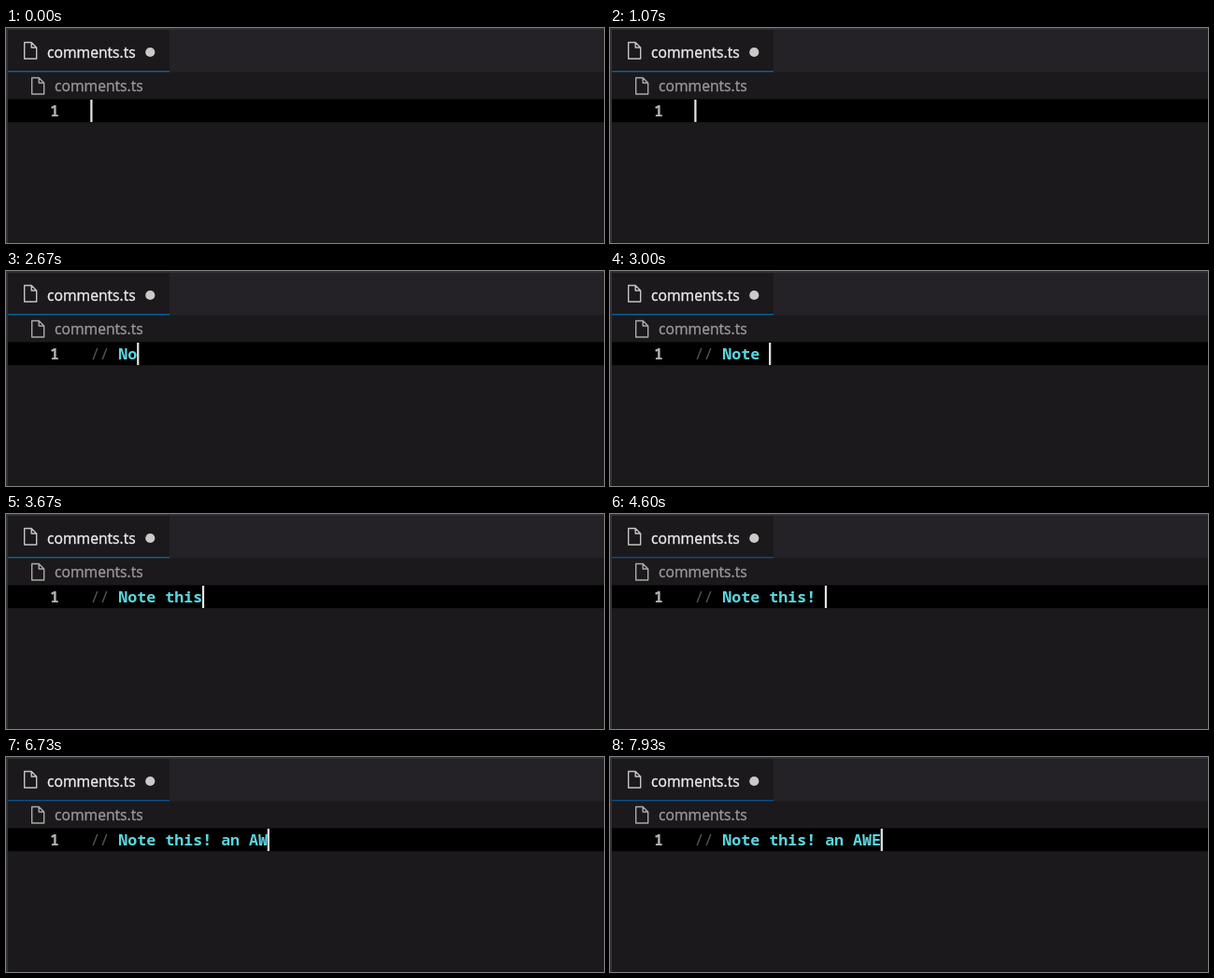
Animation, 640 px wide and 231 px high, one loop 8 s. Source, as an HTML page:

```html
<!DOCTYPE html>
<html lang="en">
<head>
<meta charset="utf-8">
<title>Typing a comment</title>
<style>
  html, body { margin: 0; width: 100%; height: 100%; overflow: hidden; background: #1b191c; }
  svg { display: block; }
  text { white-space: pre; }
  .ui { font: 15.7px "Open Sans", "Noto Sans", sans-serif; stroke-width: .35; }
  .code { font: 600 16.65px "Noto Sans Mono", "DejaVu Sans Mono", monospace; }
  .icon { fill: none; stroke-width: 1.4; stroke-linejoin: round; }
  #line { animation: dim 8s step-end infinite; }
  @keyframes dim {
    0% { fill: #0a6499; }
    52.5% { fill: #0a4f8a; }
  }
</style>
</head>
<body>
<svg width="640" height="231" viewBox="0 0 640 231">
  <defs>
    <path id="file" d="M1 1H8.5L14 6.5V18.5H1ZM8.5 1V6.5H14"/>
  </defs>
  <rect width="640" height="231" fill="#1b191c"/>
  <rect x="175" y="2" width="465" height="45.5" fill="#242226"/>
  <rect width="640" height="2" fill="#302f33"/>
  <rect width="2" height="231" fill="#333135"/>

  <use href="#file" class="icon" x="18.7" y="14.5" stroke="#c4c4c4"/>
  <text class="ui" x="44" y="32" fill="#eee" stroke="#eee">comments.ts</text>
  <circle cx="154.3" cy="26" r="5.1" fill="#cbcac8"/>
  <rect id="line" x="2" y="46" width="173" height="1.4"/>

  <use href="#file" class="icon" x="26.7" y="52.5" stroke="#aaa"/>
  <text class="ui" x="52" y="68" fill="#99979b" stroke="#99979b">comments.ts</text>

  <rect x="2" y="76.5" width="638" height="24.7" fill="#000"/>
  <text class="code" x="52" y="95" text-anchor="middle" fill="#b4b2b0">1</text>
  <text class="code" id="slashes" x="90.6" y="95" fill="#585858" style="font-weight:400"></text>
  <text class="code" id="words" x="120.3" y="95" fill="#5cd6de"></text>
  <rect id="caret" y="77" width="2.2" height="24" fill="#e4e4e4"/>
</svg>
<script>
  const LOOP = 8000, CHAR = 9.97, LEFT = 90.3;
  const comment = "// Note this! an AWE";
  // When each character is typed
  const keys = [
    1670, 1800, 1870, 2330, 2600, 2730, 2870, 3000, 3270, 3470,
    3530, 3600, 4270, 4530, 5000, 5130, 5270, 6470, 6670, 7800
  ];
  // Spans in which the caret is hidden
  const hidden = [[530, 1070], [1530, 1670], [4130, 4270], [5800, 6270], [7200, 7670]];

  const [slashes, words, caret] = ["slashes", "words", "caret"].map(id => document.getElementById(id));
  const start = performance.now();
  let shown = -1;

  function draw(now) {
    const t = Math.max(0, now - start) % LOOP;
    const count = keys.filter(k => k <= t).length;
    if (count !== shown) {
      shown = count;
      const typed = comment.slice(0, count);
      slashes.textContent = typed.slice(0, 2);
      words.textContent = typed.slice(3);
      caret.setAttribute("x", LEFT + count * CHAR);
    }
    const off = hidden.some(([a, b]) => t >= a && t < b);
    caret.setAttribute("visibility", off ? "hidden" : "visible");
    requestAnimationFrame(draw);
  }
  draw(start);
</script>
</body>
</html>
```
